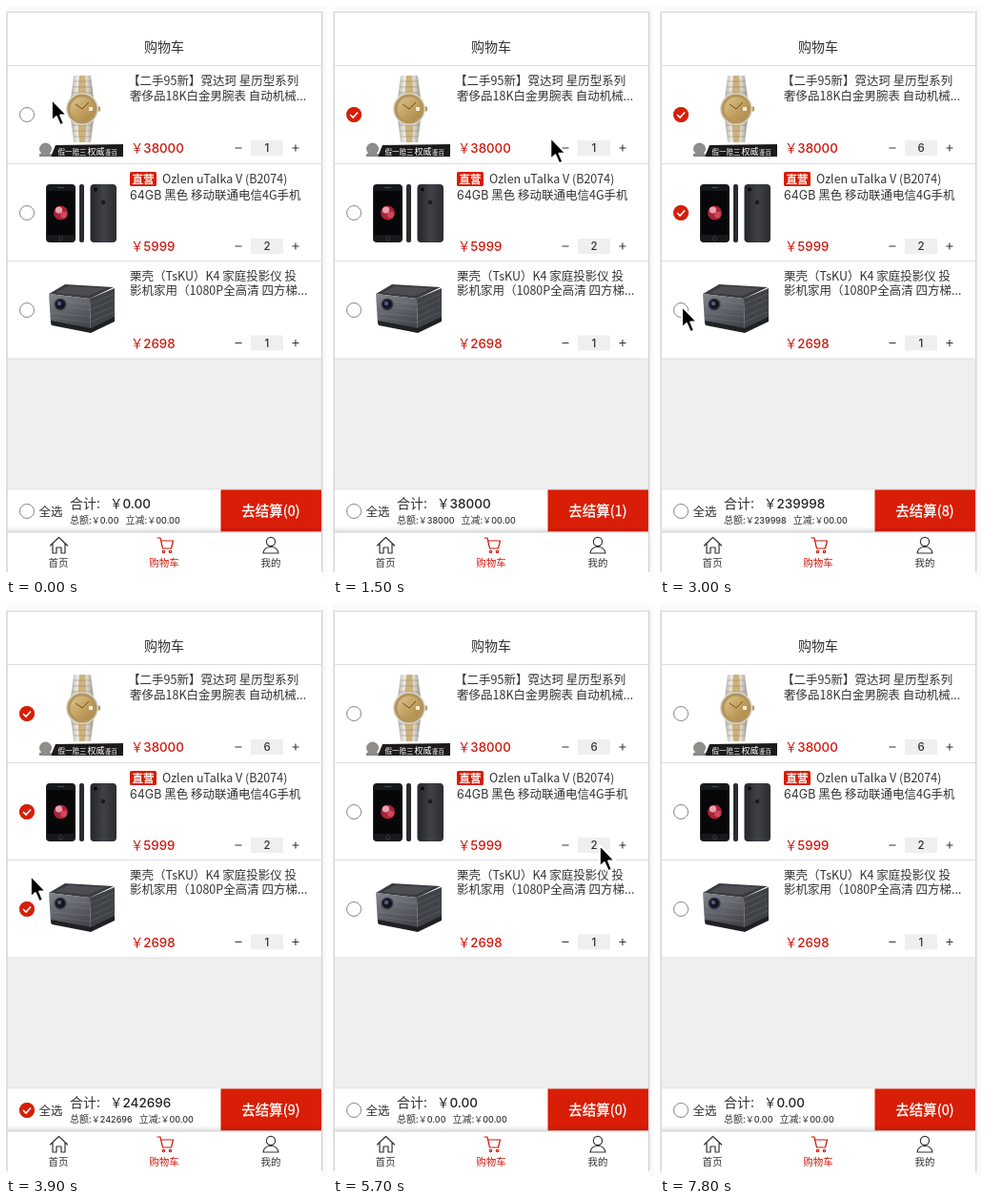
Animation, 337 px wide and 599 px high, one loop 7900 ms. Source, as an HTML page:

```html
<!DOCTYPE html>
<html lang="zh-CN">
<head>
<meta charset="utf-8">
<title>购物车</title>
<style>
  html, body { margin: 0; width: 100%; height: 100%; overflow: hidden; background: #fafafa; }
  svg { display: block; width: 337px; height: 599px; }
  text { font: 12.5px "Noto Sans CJK SC", "Noto Sans CJK", "Noto Sans", sans-serif; fill: #333; white-space: pre; }
  .mid { text-anchor: middle; }
  .num { font-family: Inter, "Noto Sans CJK SC", sans-serif; font-weight: 500; }
  .strong { stroke: currentColor; stroke-width: .3; }
  .price { font-size: 13.3px; fill: #d0160a; }
  .sum { font-size: 13.5px; fill: #222; }
  .qty { font-size: 11.5px; }
  .small { font-size: 10px; }
  .small .num { font-size: 9px; }
  .tab { font-size: 10.5px; text-anchor: middle; }
  .light { fill: #fff; color: #fff; }
  .icon { fill: none; stroke: #333; stroke-width: 1.2; stroke-linejoin: round; stroke-linecap: round; }
</style>
</head>
<body>
<svg viewBox="0 0 337 599">
  <defs>
    <linearGradient id="steel"><stop stop-color="#b4b0a8"/><stop offset=".3" stop-color="#efede8"/><stop offset=".7" stop-color="#dedbd4"/><stop offset="1" stop-color="#9c988f"/></linearGradient>
    <linearGradient id="gold" x2="1" y2="1"><stop stop-color="#dcc38c"/><stop offset=".5" stop-color="#c5a362"/><stop offset="1" stop-color="#a98548"/></linearGradient>
    <linearGradient id="back"><stop stop-color="#24252a"/><stop offset=".5" stop-color="#404146"/><stop offset="1" stop-color="#2c2d31"/></linearGradient>
    <linearGradient id="panel" x2=".4" y2="1"><stop stop-color="#83868d"/><stop offset=".55" stop-color="#5f6269"/><stop offset="1" stop-color="#44474d"/></linearGradient>
    <linearGradient id="shade" x2="0" y2="1"><stop stop-color="#000" stop-opacity="0"/><stop offset="1" stop-color="#000" stop-opacity=".12"/></linearGradient>
  </defs>

  <!-- window -->
  <path d="M0 6.5H333" stroke="#dcdcdc" stroke-width="1.5"/>
  <rect x="1.5" y="7.5" width="330" height="591.5" fill="#fff"/>
  <rect x="2" y="370" width="329" height="137" fill="#efefef"/>
  <path d="M1 7V594M331.8 7V594" stroke="#d6d6d6" stroke-width="1.5"/>
  <path d="M2 62.5H331M2 165.5H331M2 267.5H331M2 370H331M2 507H331" stroke="#dedede"/>
  <text class="mid" x="166" y="48" style="font-size:14px">购物车</text>

  <!-- watch -->
  <g>
    <path d="M71 73H89L92 97H68ZM68 119H92L89 143H71Z" fill="url(#steel)"/>
    <path d="M77 73H83L85 97H75ZM75 119H85L83 143H77Z" fill="#cdb27c"/>
    <path d="M71 79H89M70 85H90M69 91H91M69 125H91M70 131H90M71 137H89" stroke="#8d816b" stroke-width=".7" opacity=".7"/>
    <rect x="96" y="105.500" width="3" height="5" rx="1" fill="#b59a60"/>
    <circle cx="80" cy="108" r="17" fill="#d8d4ca"/>
    <circle cx="80" cy="108" r="15.500" fill="#b3955c"/>
    <circle cx="80" cy="108" r="12.500" fill="url(#gold)"/>
    <path d="M80 108L73 103M80 108L87 101" stroke="#6d4f1e"/>
    <rect x="87" y="106" width="4" height="4" fill="#f3ead2"/>
    <path d="M52 146L123 145V158H47Z" fill="#1d1a1c"/>
    <path d="M35 155H48L47 158H35Z" fill="#8b8987"/>
    <circle cx="41.5" cy="150" r="6.5" fill="#8f8d8a"/>
    <text class="light" x="54.5" y="156" style="font-size:7.5px">假一赔三</text>
    <text class="light" x="85.500" y="156" style="font-size:9px">权威</text>
    <text class="light" x="104" y="155.500" style="font-size:6.5px">鉴百</text>
  </g>

  <!-- phone -->
  <g>
    <rect x="42" y="187" width="31" height="61" rx="4" fill="#17181c"/>
    <rect x="43.500" y="194" width="28" height="46" fill="#07070a"/>
    <circle cx="57.500" cy="217" r="7.500" fill="#a82238"/>
    <circle cx="55.500" cy="214" r="3.600" fill="#e8a3ab"/>
    <circle cx="60.500" cy="219" r="3.400" fill="#d34759"/>
    <circle cx="57.500" cy="243.800" r="2.100" fill="none" stroke="#4a4b50" stroke-width=".7"/>
    <path d="M54 190.500H61" stroke="#55565a" stroke-width=".8"/>
    <rect x="77" y="187" width="5" height="61" rx="2" fill="#2a2b2f"/>
    <rect x="88.500" y="187" width="27.500" height="61" rx="4" fill="url(#back)"/>
    <circle cx="94" cy="192.500" r="2" fill="#0b0b0d"/>
    <circle cx="102" cy="206" r="2.200" fill="#191a1d"/>
  </g>

  <!-- projector -->
  <g>
    <path d="M45 302L62 292L113 295L88 307Z" fill="#3a3b3f"/>
    <path d="M52 301L65 294L105 296L86 304Z" fill="#4c4e53"/>
    <path d="M45 302L88 307L89 342L47 334Z" fill="url(#panel)"/>
    <path d="M88 307L114 296V330L89 342Z" fill="#3f4247"/>
    <path d="M47 330L89 338L114 326V331L89 343L48 335Z" fill="#1f2023"/>
    <path d="M65 310L88 313L113 302M65 316L88 319L113 308M48 322L88 326L113 315M48 327L88 332L113 321" fill="none" stroke="#a5a8ad" stroke-width=".5" opacity=".4"/>
    <circle cx="57" cy="313" r="6.500" fill="#3b3d43"/>
    <circle cx="57" cy="313" r="5" fill="#15161c"/>
    <circle cx="56" cy="312" r="2.200" fill="#4b5d8c"/>
  </g>

  <!-- product titles -->
  <text x="128" y="82.5">【二手95新】霓达珂 星历型系列</text>
  <text x="130" y="98.5">奢侈品18K白金男腕表 自动机械...</text>
  <rect x="130" y="174" width="28" height="15" rx="1.5" fill="#d81e06"/>
  <text class="mid light strong" x="144" y="185.7" style="font-size:11.5px">直营</text>
  <text x="164" y="185.5">Ozlen uTalka V (B2074)</text>
  <text x="130" y="202.5"><tspan class="num" style="font-weight:400">64GB</tspan> 黑色 移动联通电信4G手机</text>
  <text x="130" y="287.5">栗壳（TsKU）K4 家庭投影仪 投</text>
  <text x="130" y="303">影机家用（1080P全高清 四方梯...</text>
  <g id="rows"></g>

  <!-- totals -->
  <rect x="2" y="507.5" width="329" height="44" fill="#fff"/>
  <text x="34.5" y="534.5">全选</text>
  <text x="67" y="527" style="font-size:14px">合计:</text>
  <text class="sum num" id="sum" x="109" y="527"></text>
  <text class="small" x="67" y="542.5">总额:<tspan class="num" id="total"></tspan><tspan dx="7">立减:</tspan><tspan class="num">￥00.00</tspan></text>
  <rect x="225.5" y="507.5" width="105.5" height="44" fill="#d81e06"/>
  <text class="mid light strong" id="pay" x="278" y="535" style="font-size:14.5px"></text>

  <!-- tab bar -->
  <rect x="2" y="546" width="329" height="6" fill="url(#shade)"/>
  <rect x="2" y="552" width="329" height="47" fill="#fff"/>
  <path d="M2 552H331" stroke="#d2d2d2"/>
  <path class="icon" d="M46.5 566L55.5 557.5L64.5 566M49 564V574H53V568H58V574H62V564"/>
  <g class="icon" style="stroke:#d0160a">
    <path d="M159 558H162L164.500 569H173.500L175.500 561H163"/>
    <circle cx="165.500" cy="572.500" r="1.200"/><circle cx="172.500" cy="572.500" r="1.200"/>
  </g>
  <g class="icon"><circle cx="278" cy="562" r="4.6"/><path d="M270 574Q271 567.5 278 567.5T286 574Z"/></g>
  <text class="tab" x="55" y="587.5">首页</text>
  <text class="tab" x="166" y="587.5" style="fill:#d0160a">购物车</text>
  <text class="tab" x="278" y="587.5">我的</text>

  <g id="boxes"></g>
  <path id="cursor" d="M0 0V22.5L5 18L9 27L12.8 25.3L9 16.5H16Z" fill="#000" stroke="#fff" stroke-width="1.8" stroke-linejoin="round"/>
</svg>
<script>
  const $ = id => document.getElementById(id);
  const LOOP = 7900, STEP = 100, CLEAR = 5200;
  const items = [
    { price: 38000, qty: 1, y: 149, box: 114, on: 1000 },
    { price: 5999, qty: 2, y: 252, box: 217, on: 2800 },
    { price: 2698, qty: 1, y: 353.5, box: 319, on: 3200 }
  ];
  const plusClicks = [1800, 2000, 2200, 2300, 2400];
  // time, x, y of the pointer tip
  const path = [
    [0, 48, 98], [300, 46, 99], [800, 28, 110], [1100, 21, 113], [1700, 301, 147],
    [2400, 301, 147], [2700, 21, 214], [2800, 21, 214], [3000, 23, 315], [3400, 22, 317],
    [4700, 34, 217], [5100, 20, 528], [5200, 20, 528], [5500, 193, 400],
    [5700, 280, 252], [5900, 281, 252], [6400, 345, 215], [LOOP, 345, 215]
  ];

  $("rows").innerHTML = items.map(({ price, qty, y }, i) => `
    <text class="price num" x="131" y="${y + 5}">￥${price}</text>
    <path d="M240.5 ${y}H247.5M300.5 ${y}H307.5M304 ${y - 3.5}V${y + 3.5}" stroke="#333" stroke-width="1.1"/>
    <rect x="257" y="${y - 8}" width="34" height="16" fill="#efefef"/>
    <text class="mid num qty" id="qty${i}" x="274" y="${y + 4}">${qty}</text>`).join("");

  $("boxes").innerHTML = [...items.map(item => item.box), 530].map((y, i) => `
    <circle cx="22" cy="${y}" r="7.5" fill="#fff" stroke="#888"/>
    <g id="check${i}"><circle cx="22" cy="${y}" r="8" fill="#d81e06"/>
    <path d="M18 ${y}L21 ${y + 3}L26 ${y - 2.5}" fill="none" stroke="#fff" stroke-width="1.7"/></g>`).join("");

  function pointer(t) {
    const i = path.findIndex(p => p[0] > t);
    const [t0, x0, y0] = path[i - 1], [t1, x1, y1] = path[i];
    const u = (t - t0) / (t1 - t0), e = u * u * (3 - 2 * u);
    return [x0 + (x1 - x0) * e, y0 + (y1 - y0) * e];
  }

  function draw(t) {
    let sum = 0, count = 0, all = true;
    items.forEach((item, i) => {
      const on = t >= item.on && t < CLEAR;
      const qty = item.qty + (i ? 0 : plusClicks.filter(c => c <= t).length);
      if (on) { sum += qty * item.price; count += qty; }
      all = all && on;
      $("qty" + i).textContent = qty;
      $("check" + i).style.display = on ? "" : "none";
    });
    $("check3").style.display = all ? "" : "none";
    $("sum").textContent = $("total").textContent = "￥" + (sum || "0.00");
    $("pay").textContent = `去结算(${count})`;
    $("cursor").setAttribute("transform", `translate(${pointer(t)})`);
  }

  const start = performance.now();
  function frame() {
    const t = (performance.now() - start) % LOOP;
    draw(Math.floor(t / STEP) * STEP);
    requestAnimationFrame(frame);
  }
  frame();
</script>
</body>
</html>
```
